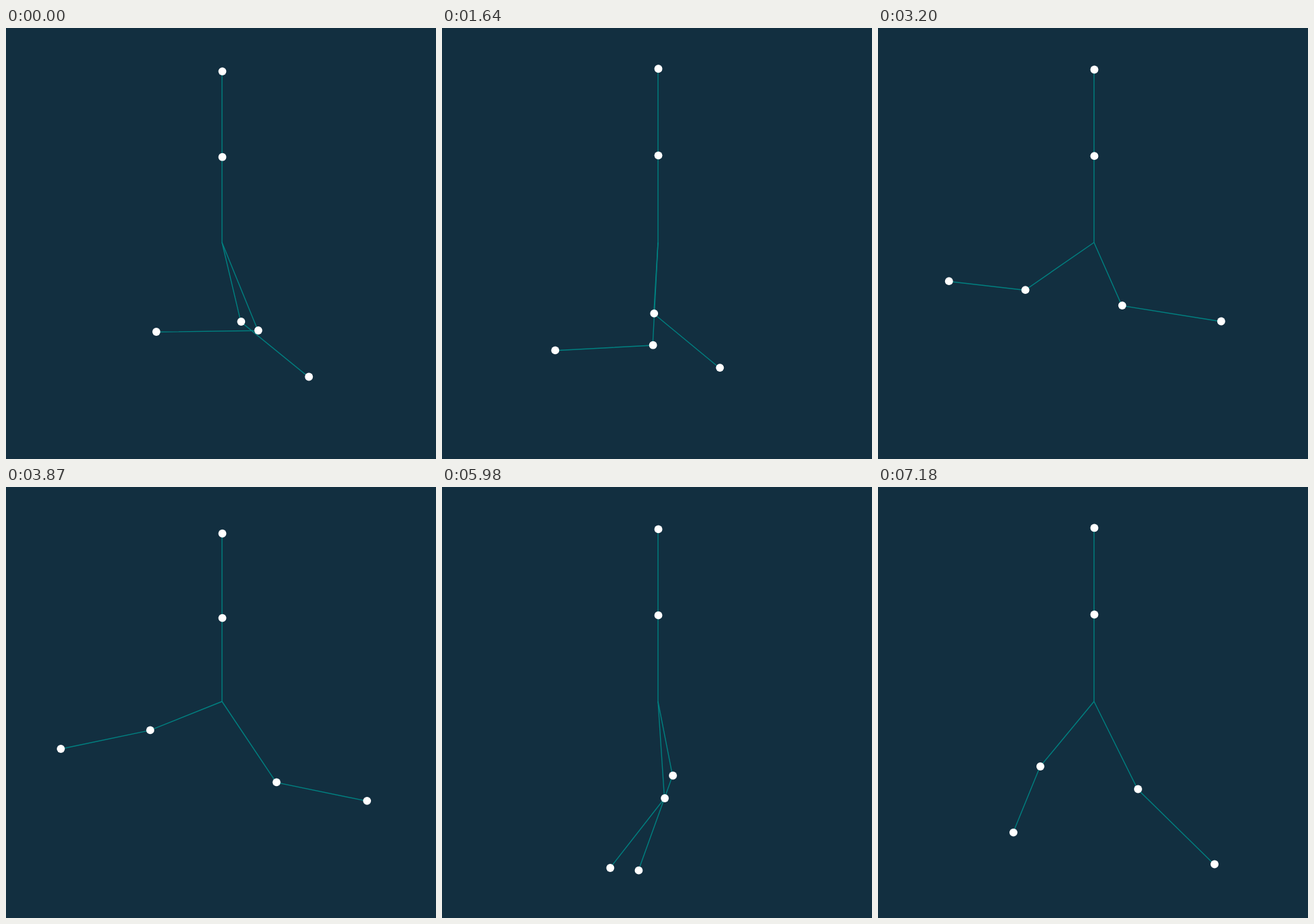
Write an HTML page that moves like this. It is 635x637 px and loops after 7250 ms.

```html
<!DOCTYPE html>
<html lang="en">
<head>
<meta charset="utf-8">
<title>Spring pendulums</title>
<style>
  html, body { margin: 0; width: 100%; height: 100%; overflow: hidden; background: #122f40; }
  svg { display: block; width: 100%; height: 100%; }
  path { fill: none; stroke: #008080; stroke-width: 1.4; }
  circle { fill: #fff; }
</style>
</head>
<body>
<svg viewBox="0 0 635 637"></svg>
<script>
const LOOP = 7250, STEPS = 107, STEP = LOOP / STEPS;   // the picture changes once per step
const SUB = 6, NODES = STEPS * SUB + 1, SIZE = NODES * 4, BAND = 9;
const H2 = (STEP / SUB / 1000) ** 2;
const PIVOT = [319.5, 316.7];
const REST = 128.4, STIFF = 55.7, GRAVITY = 89;        // px, 1/s², px/s²
const MODEL_WEIGHT = 3000, POSE_WEIGHT = 100;

// Key poses: step, then knee and foot of each leg. The physics fills in the rest.
const poses = [
  [0, [347.3, 434, 447.3, 515.5], [372.6, 447, 222, 449]],
  [12, [342, 459, 308, 577.3], [328, 473, 335, 609.5]],
  [37, [228.5, 447.5, 97, 413.8], [334.2, 427.7, 475.5, 430]],
  [57, [213, 359.4, 81, 387], [399.5, 436.3, 533.2, 463.8]],
  [73, [216.4, 348.5, 177, 477.7], [414.7, 390, 405.5, 501]],
  [88, [329, 460, 248.5, 563], [341, 426.5, 290.5, 566.7]],
  [106, [384, 446.5, 497, 557.5], [239.8, 413, 200, 510.6]]
];

// Spring force on a link (dx, dy) with its derivatives.
function spring(dx, dy) {
  const len = Math.hypot(dx, dy), pull = STIFF * (1 - REST / len), turn = STIFF * REST / len ** 3;
  return { x: pull * dx, y: pull * dy,
           xx: pull + turn * dx * dx, xy: turn * dx * dy, yy: pull + turn * dy * dy };
}

// Starting path: link angles and lengths blended between poses.
function roughPath(marks) {
  const path = new Float64Array(SIZE);
  const polar = (x, y) => [Math.atan2(x, y), Math.hypot(x, y)];
  const keys = marks.map(([step, [a, b, c, d]]) =>
    [step * SUB, ...polar(a - PIVOT[0], b - PIVOT[1]), ...polar(c - a, d - b)]);
  for (let i = 0; i < NODES; i++) {
    let k = 0;
    while (k < keys.length - 2 && keys[k + 1][0] <= i) k++;
    const p = keys[k], q = keys[k + 1], u = (i - p[0]) / (q[0] - p[0]);
    const [, a, l, b, m] = p.map((v, n) => v + (q[n] - v) * u);
    const x = l * Math.sin(a), y = l * Math.cos(a);
    path.set([x, y, x + m * Math.sin(b), y + m * Math.cos(b)], i * 4);
  }
  return path;
}

// Least-squares system: equations of motion plus the key poses.
function assemble(path, marks) {
  const mat = new Float64Array(SIZE * BAND), grad = new Float64Array(SIZE);
  let cost = 0;
  function add(ids, coefs, res, weight) {
    cost += weight * res * res;
    ids.forEach((i, a) => {
      const w = weight * coefs[a];
      grad[i] += w * res;
      for (let b = 0; b < ids.length; b++)
        if (ids[b] <= i) mat[i * BAND + i - ids[b]] += w * coefs[b];
    });
  }
  for (let u = 4; u < SIZE - 4; u += 4) {
    const s = spring(path[u], path[u + 1]);
    const r = spring(path[u + 2] - path[u], path[u + 3] - path[u + 1]);
    const acc = [r.x - s.x, GRAVITY + r.y - s.y, -r.x, GRAVITY - r.y];
    const jac = [
      [-s.xx - r.xx, -s.xy - r.xy, r.xx, r.xy],
      [-s.xy - r.xy, -s.yy - r.yy, r.xy, r.yy],
      [r.xx, r.xy, -r.xx, -r.xy],
      [r.xy, r.yy, -r.xy, -r.yy]
    ];
    jac.forEach((row, c) => {
      const coefs = [1, ...row.map((j, n) => -H2 * j - (n === c ? 2 : 0)), 1];
      const res = path[u + 4 + c] - 2 * path[u + c] + path[u - 4 + c] - H2 * acc[c];
      add([u - 4 + c, u, u + 1, u + 2, u + 3, u + 4 + c], coefs, res, MODEL_WEIGHT);
    });
  }
  for (const [step, pose] of marks) pose.forEach((v, c) => {
    const i = step * SUB * 4 + c;
    add([i], [1], path[i] - v + PIVOT[c % 2], POSE_WEIGHT);
  });
  return { cost, mat, grad };
}

// Banded Cholesky solve of (mat + damping) d = -grad.
function descent({ mat, grad }, damping) {
  const low = mat.slice(), d = new Float64Array(SIZE);
  for (let i = 0; i < SIZE; i++) {
    const first = Math.max(0, i - BAND + 1);
    for (let j = first; j <= i; j++) {
      let sum = low[i * BAND + i - j] + (i === j ? damping : 0);
      for (let k = first; k < j; k++) sum -= low[i * BAND + i - k] * low[j * BAND + j - k];
      low[i * BAND + i - j] = i === j ? Math.sqrt(Math.max(sum, 1e-12)) : sum / low[j * BAND];
    }
    let sum = -grad[i];
    for (let k = first; k < i; k++) sum -= low[i * BAND + i - k] * d[k];
    d[i] = sum / low[i * BAND];
  }
  for (let i = SIZE - 1; i >= 0; i--) {
    d[i] /= low[i * BAND];
    for (let k = Math.max(0, i - BAND + 1); k < i; k++) d[k] -= low[i * BAND + i - k] * d[i];
  }
  return d;
}

// Levenberg-Marquardt fit of one leg's motion through its poses.
function swing(marks) {
  let path = roughPath(marks), state = assemble(path, marks), damping = 1;
  for (let n = 0; n < 60; n++) {
    const change = descent(state, damping);
    const trial = path.map((v, i) => v + change[i]);
    const next = assemble(trial, marks);
    if (next.cost < state.cost) {
      const settled = damping < 1e-5 && state.cost - next.cost < 1e-4 * state.cost;
      path = trial;
      state = next;
      damping = Math.max(damping * 0.15, 1e-8);
      if (settled) break;
    } else {
      damping *= 6;
    }
  }
  return { path, cost: state.cost };
}

// Where the legs pass each other, keep the assignment that obeys the physics best.
function findLegs() {
  let best = { cost: Infinity };
  for (const early of [0, 1]) for (const late of [0, 1]) {
    const swaps = { 1: early, 5: late };
    const legs = [0, 1].map(leg =>
      swing(poses.map(([step, ...pair], k) => [step, pair[leg ^ (swaps[k] || 0)]])));
    const cost = legs[0].cost + legs[1].cost;
    if (cost < best.cost) best = { cost, legs };
  }
  return best.legs.map(leg => leg.path);
}

const svg = document.querySelector("svg");
function shape(name, attrs = {}) {
  const el = document.createElementNS("http://www.w3.org/2000/svg", name);
  for (const key in attrs) el.setAttribute(key, attrs[key]);
  return svg.appendChild(el);
}
const lines = Array.from({ length: 3 }, () => shape("path"));
const dots = Array.from({ length: 6 }, () => shape("circle", { r: 5.9 }));
const legs = findLegs();

// The balanced arm bobs in its slow mode, with amplitudes in the golden ratio.
function upright(step) {
  const bob = 3.04 * Math.cos((17.9 * step - 78) * Math.PI / 180);
  return [PIVOT[0], 191.35 - bob, PIVOT[0], 65.1 - 1.618 * bob];
}

function legAt(path, step) {
  const i = step * SUB * 4;
  return Array.from(path.subarray(i, i + 4), (v, c) => v + PIVOT[c % 2]);
}

function draw(time) {
  const step = Math.floor((time + 5) / STEP) % STEPS;
  const at = (x, y) => `${(x - 0.5).toFixed(2)} ${(y + 0.3).toFixed(2)}`;
  [upright(step), ...legs.map(path => legAt(path, step))].forEach(([ax, ay, bx, by], n) => {
    lines[n].setAttribute("d", `M${at(...PIVOT)}L${at(ax, ay)}L${at(bx, by)}`);
    [[ax, ay], [bx, by]].forEach(([x, y], k) => {
      dots[n * 2 + k].setAttribute("cx", x.toFixed(2));
      dots[n * 2 + k].setAttribute("cy", y.toFixed(2));
    });
  });
}

const start = performance.now();
function tick() {
  draw(Math.max(0, performance.now() - start) % LOOP);
  requestAnimationFrame(tick);
}
tick();
</script>
</body>
</html>
```
